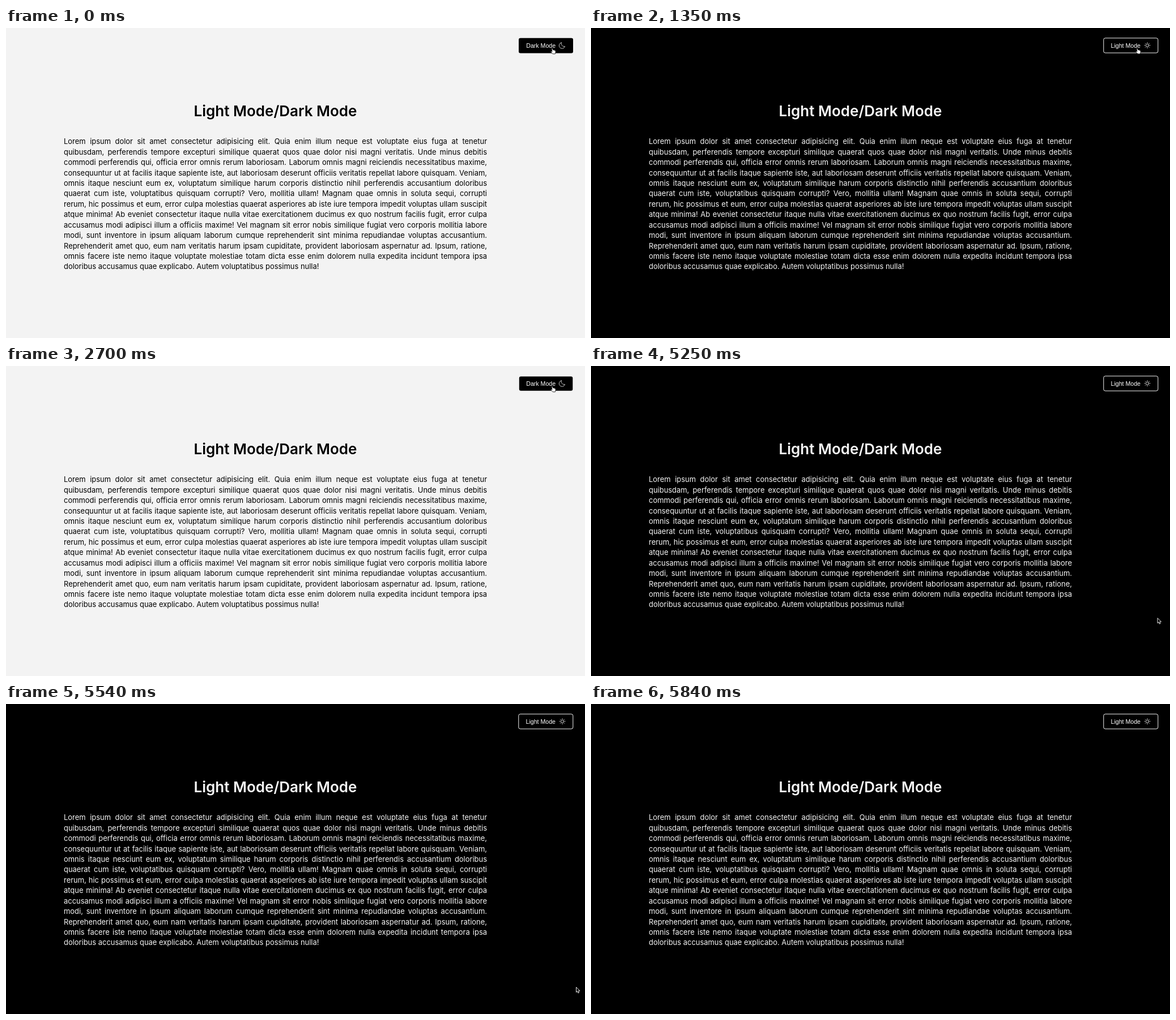
These frames come from a looping animation (1022x548 px, 6.35 s). An HTML page:

```html
<!DOCTYPE html>
<html lang="en">
<head>
<meta charset="utf-8">
<title>Light Mode/Dark Mode</title>
<style>
  html, body { margin: 0; width: 100%; height: 100%; overflow: hidden; }
  body { --bg: #f3f3f3; --ink: #000; position: relative; background: var(--bg); color: var(--ink); font-family: Inter, sans-serif; }
  body.dark { --bg: #000; --ink: #f5f5f5; }
  h1 { position: absolute; left: 102px; top: 132px; width: 747px; margin: 0; font-size: 26px; font-weight: 600; line-height: 30px; text-align: center; }
  main { position: absolute; left: 102px; top: 191.3px; width: 747px; font-size: 12.95px; line-height: 18.42px; white-space: nowrap; }
  .justified { text-align: justify; text-align-last: justify; word-spacing: -1px; }
  svg { position: absolute; left: 0; top: 0; }
  #label { font: 10.6px "Liberation Sans", Arial, sans-serif; fill: #fff; }
  .icon { fill: none; stroke: #fff; stroke-width: 1.1; stroke-linecap: round; }
  .dark .moon, body:not(.dark) .sun { display: none; }
</style>
</head>
<body>
<h1>Light Mode/Dark Mode</h1>
<main>
  <div class="justified">
    Lorem ipsum dolor sit amet consectetur adipisicing elit. Quia enim illum neque est voluptate eius fuga at tenetur<br>
    quibusdam, perferendis tempore excepturi similique quaerat quos quae dolor nisi magni veritatis. Unde minus debitis<br>
    commodi perferendis qui, officia error omnis rerum laboriosam. Laborum omnis magni reiciendis necessitatibus maxime,<br>
    consequuntur ut at facilis itaque sapiente iste, aut laboriosam deserunt officiis veritatis repellat labore quisquam. Veniam,<br>
    omnis itaque nesciunt eum ex, voluptatum similique harum corporis distinctio nihil perferendis accusantium doloribus<br>
    quaerat cum iste, voluptatibus quisquam corrupti? Vero, mollitia ullam! Magnam quae omnis in soluta sequi, corrupti<br>
    rerum, hic possimus et eum, error culpa molestias quaerat asperiores ab iste iure tempora impedit voluptas ullam suscipit<br>
    atque minima! Ab eveniet consectetur itaque nulla vitae exercitationem ducimus ex quo nostrum facilis fugit, error culpa<br>
    accusamus modi adipisci illum a officiis maxime! Vel magnam sit error nobis similique fugiat vero corporis mollitia labore<br>
    modi, sunt inventore in ipsum aliquam laborum cumque reprehenderit sint minima repudiandae voluptas accusantium.<br>
    Reprehenderit amet quo, eum nam veritatis harum ipsam cupiditate, provident laboriosam aspernatur ad. Ipsum, ratione,<br>
    omnis facere iste nemo itaque voluptate molestiae totam dicta esse enim dolorem nulla expedita incidunt tempora ipsa
  </div>
  <div>doloribus accusamus quae explicabo. Autem voluptatibus possimus nulla!</div>
</main>
<svg width="1022" height="548">
  <rect id="button" rx="3"/>
  <text id="label" y="34.5"></text>
  <path class="icon moon" transform="translate(976 25.2) scale(.7)" d="M6 1A7.5 7.5 0 1 0 15 10.5A7.6 7.6 0 0 1 6 1Z"/>
  <g class="icon sun" transform="translate(982 30.7)" stroke-width=".8">
    <circle r="2.6" style="stroke-width:.8"/>
    <path id="rays" style="stroke-width:.8"/>
  </g>
  <path id="hand" transform="translate(961 35)" fill="#fff" stroke="#000" stroke-width=".8" stroke-linejoin="round"
    d="M2 1.2Q2.6 .2 3.5 1.1L4.6 4Q5.6 3.3 6.2 4.2Q7.2 3.6 7.7 4.7Q8.8 4.4 9 5.6L9.2 8L8.3 10.8H4.2L.8 7.2Q.3 6.2 1.6 6.1L3 6.9Z"/>
  <path id="arrow" fill="#000" stroke="#fff" stroke-width=".9" stroke-linejoin="round"
    d="M.5 .6V9.5L2.5 7.7L3.8 10.9L5.5 10.2L4.2 7.1H7Z"/>
</svg>
<script>
  const LOOP = 6350;
  const $ = id => document.getElementById(id);
  const set = (el, attrs) => Object.entries(attrs).forEach(([name, value]) => el.setAttribute(name, value));

  // Pointer exit: start time, x, y
  const exitPath = [[5250, 999.5, 445], [5390, 1006, 483.5], [5540, 1006, 500], [5690, 1005, 538]];

  set($('rays'), { d: Array.from({ length: 8 }, (_, i) => {
    const c = Math.cos(i * Math.PI / 4), s = Math.sin(i * Math.PI / 4);
    return `M${4.1 * c} ${4.1 * s}L${5.1 * c} ${5.1 * s}`;
  }).join('') });

  function draw(now) {
    const t = now % LOOP;
    const dark = t >= 1350 && t < 2700 || t >= 3900;
    document.body.classList.toggle('dark', dark);
    $('label').textContent = dark ? 'Light Mode' : 'Dark Mode';
    set($('label'), { x: dark ? 917.6 : 918.3 });

    const [x, y, width, height] = dark ? [904.8, 17.8, 96, 26.2]
      : t < 1350 ? [905, 17.7, 96, 26.7] : [905.8, 18.5, 94.5, 25.2];
    set($('button'), { x, y, width, height, stroke: dark ? '#f3f3f3' : 'none' });

    $('hand').style.display = t < 5250 ? '' : 'none';
    const spot = t < 5840 && exitPath.findLast(([start]) => t >= start);
    $('arrow').style.display = spot ? '' : 'none';
    if (spot) set($('arrow'), { transform: `translate(${spot[1]} ${spot[2]})` });
  }

  const begin = performance.now();
  function tick() {
    draw(performance.now() - begin);
    requestAnimationFrame(tick);
  }
  tick();
</script>
</body>
</html>
```
